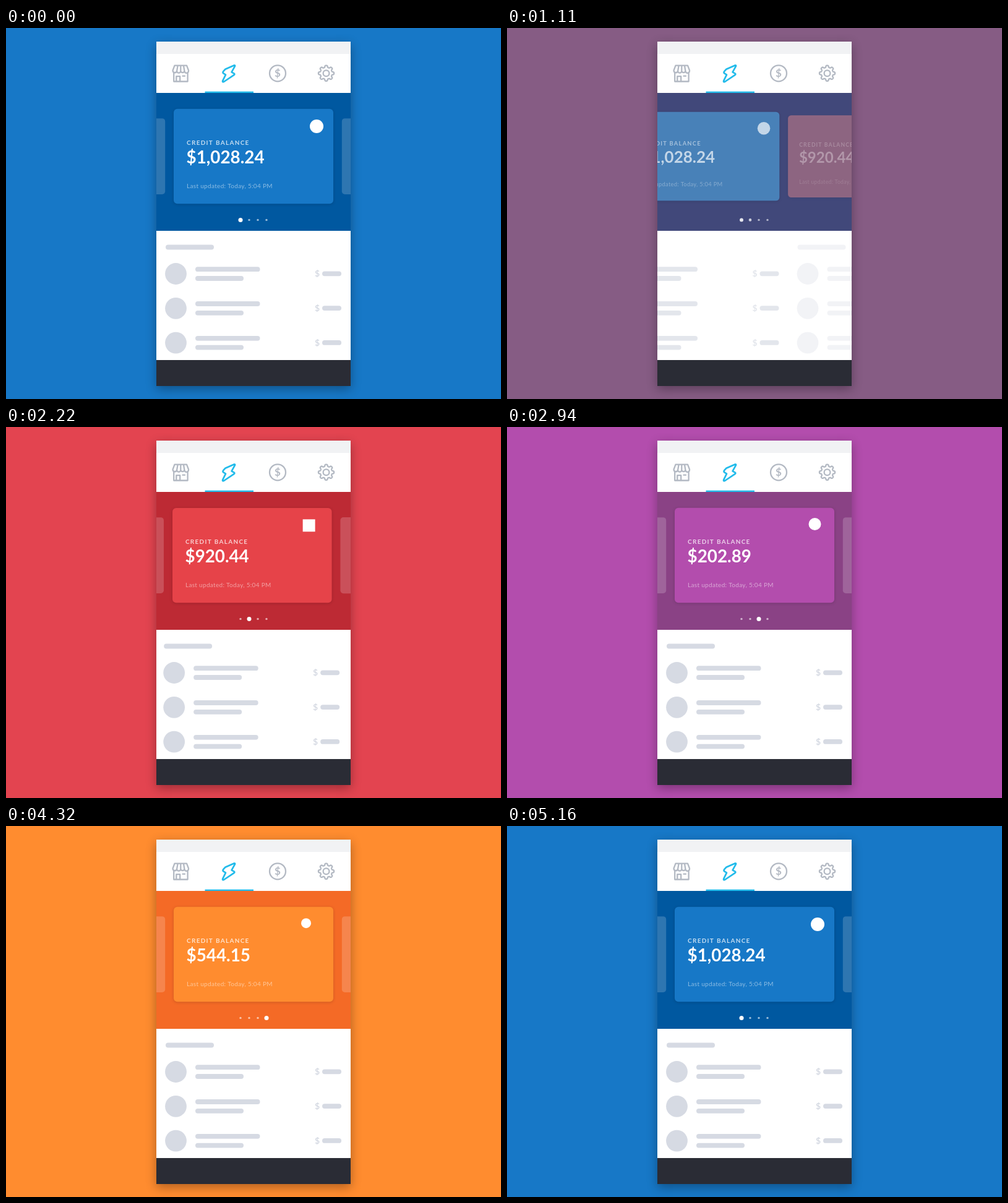
An HTML page with a canvas that plays this animation: 800 px wide and 600 px high, repeating every 5.19 s.

```html
<!DOCTYPE html>
<html lang="en">
<head>
<meta charset="utf-8">
<title>Card balances</title>
<style>
  html, body { margin: 0; width: 100%; height: 100%; overflow: hidden; }
  canvas { display: block; width: 800px; height: 600px; }
</style>
</head>
<body>
<canvas id="stage" width="800" height="600"></canvas>
<script>
const ctx = document.getElementById('stage').getContext('2d');
const LOOP = 5190, FIRST = 967, STEP = 1210.4, SLIDE = 332, FADE = 275;
const FONT = 'Lato, "Open Sans", sans-serif';
const GREY = '#d6dae3', ICON = '#b3b9c3', ACCENT = '#22bbea';
const CARD = { x: 400, y: 207.6, w: 258, h: 153.5, gap: 246 };

// mark: [shape, x, y, radius] relative to the card centre
const slides = [
  { main: [23, 120, 199], dark: [0, 88, 160], sum: '$1,028.24', mark: ['circle', 102, -48.6, 11] },
  { main: [231, 67, 73], dark: [189, 42, 51], sum: '$920.44', mark: ['square', 92, -48.4, 10] },
  { main: [179, 77, 173], dark: [138, 66, 133], sum: '$202.89', mark: ['circle', 97.5, -50.6, 10] },
  { main: [255, 140, 47], dark: [244, 106, 38], sum: '$544.15', mark: ['circle', 85, -50.4, 8] }
];

const clamp = v => Math.max(0, Math.min(1, v));
const cubic = u => u < 0.5 ? 4 * u ** 3 : 1 - 4 * (1 - u) ** 3;
const smooth = u => u * u * (3 - 2 * u);
const rgb = c => `rgb(${c.map(Math.round).join()})`;
const mix = (a, b, k) => rgb(a.map((v, i) => v + (b[i] - v) * k));

function rect(x, y, w, h, color) {
  ctx.fillStyle = color;
  ctx.fillRect(x, y, w, h);
}

function round(x, y, w, h, r, color) {
  ctx.fillStyle = color;
  ctx.beginPath();
  ctx.roundRect(x, y, w, h, r);
  ctx.fill();
}

function disc(x, y, r, color) {
  ctx.fillStyle = color;
  ctx.beginPath();
  ctx.arc(x, y, r, 0, 7);
  ctx.fill();
}

function text(str, x, y, font, color, spacing = 0, align = 'left') {
  ctx.font = `${font} ${FONT}`;
  ctx.letterSpacing = spacing + 'px';
  ctx.textAlign = align;
  ctx.fillStyle = color;
  ctx.fillText(str, x, y);
}

function shadow(color, blur, dy) {
  ctx.shadowColor = color;
  ctx.shadowBlur = blur;
  ctx.shadowOffsetY = dy;
}

const store = new Path2D(
  'M272.5 60.7H292L295 68.5V69.5A3.3 3.3 0 0 1 288.4 69.5A3.1 3.1 0 0 1 282.3 69.5' +
  'A3.1 3.1 0 0 1 276.1 69.5A3.3 3.3 0 0 1 269.6 69.5V68.5Z' +
  'M277.6 61L276.1 69.5M287 61L288.4 69.5M282.3 61V69.5' +
  'M271.2 73V86.5H293.6V73M275.3 86V78.2H281.2V86M285.5 77.7H289');
const bolt = new Path2D(
  'M369 60.3Q370.6 60.2 369.9 61.8L364.6 71.3L368.6 73.6Q370 74.6 368.6 75.8' +
  'L352 87Q349.4 87.8 350.2 85.4L355 75.6L351.2 73.2Q349.9 72 351.2 70.2L354.2 66.8Z');
const gear = new Path2D();
for (let i = 0; i < 160; i++) {
  const a = i / 160 * Math.PI * 2;
  const r = 11.1 + 1.5 * Math.tanh(2.2 * Math.cos(8 * a));
  gear.lineTo(517.5 + r * Math.cos(a), 73.2 + r * Math.sin(a));
}
gear.closePath();
gear.moveTo(522.4, 73.2);
gear.arc(517.5, 73.2, 4.9, 0, 7);
const coin = new Path2D();
coin.arc(439, 73.3, 13, 0, 7);

function drawNav() {
  rect(243, 22, 314, 20, '#f1f2f4');
  rect(243, 42, 314, 63, '#fff');
  ctx.lineWidth = 2.3;
  ctx.lineJoin = ctx.lineCap = 'round';
  ctx.strokeStyle = ICON;
  for (const icon of [store, coin, gear]) ctx.stroke(icon);
  text('$', 439, 79.2, 'bold 17px', ICON, 0, 'center');
  ctx.lineWidth = 2.7;
  ctx.strokeStyle = ACCENT;
  ctx.stroke(bolt);
  rect(321.5, 102.6, 78.5, 2.4, ACCENT);
}

function drawCard(slide, off) {
  const side = clamp(Math.abs(off)), scale = 1 - 0.2 * side;
  const { w, h } = CARD;
  ctx.save();
  ctx.translate(CARD.x + off * CARD.gap, CARD.y);
  ctx.scale(scale, scale);
  ctx.globalAlpha = 1 - side;
  shadow('rgba(0,0,0,.16)', 5, 1);
  round(-w / 2, -h / 2, w, h, 6, rgb(slide.main));
  shadow('transparent', 0, 0);
  ctx.globalAlpha = 0.18 * Math.min(1, side * 3);
  round(-w / 2, -h / 2, w, h, 6, '#fff');

  ctx.globalAlpha = 1 - side;
  const [shape, x, y, r] = slide.mark;
  if (shape === 'circle') disc(x, y, r, '#fff');
  else rect(x - r, y - r, r * 2, r * 2, '#fff');
  text('CREDIT BALANCE', -108, -18.4, 'bold 10px', 'rgba(255,255,255,.75)', 1.3);
  text(slide.sum, -108.4, 11.6, 'bold 27.8px', '#fff');
  text('Last updated: Today, 5:04 PM', -108, 51.6, '10px', 'rgba(255,255,255,.5)', 0.32);
  ctx.restore();
}

function drawList(off) {
  ctx.save();
  ctx.translate(off * 314, 0);
  ctx.globalAlpha = clamp(1 - Math.abs(off));
  round(258, 350.5, 78, 8, 4, GREY);
  for (let i = 0; i < 3; i++) {
    const y = 397.5 + i * 55.8;
    disc(274.5, y, 17.4, GREY);
    round(306, y - 11.2, 104.5, 7.8, 3.9, GREY);
    round(306, y + 3.6, 78, 7.8, 3.9, GREY);
    text('$', 503, y + 4.6, 'bold 14px', GREY, 0, 'center');
    round(511, y - 4.1, 31, 7.8, 3.9, GREY);
  }
  ctx.restore();
}

function draw(t) {
  const n = Math.max(0, Math.min(3, Math.floor((t - FIRST) / STEP)));
  const local = t - FIRST - n * STEP;
  const p = cubic(clamp(local / SLIDE));
  const from = slides[n], to = slides[(n + 1) % 4];

  rect(0, 0, 800, 600, mix(from.main, to.main, smooth(clamp(local / FADE))));
  shadow('rgba(0,0,0,.32)', 16, 5);
  rect(243, 22, 314, 557, '#fff');
  shadow('transparent', 0, 0);
  drawNav();

  ctx.save();
  ctx.beginPath();
  ctx.rect(243, 105, 314, 432);
  ctx.clip();
  rect(243, 105, 314, 223, mix(from.dark, to.dark, Math.min(1, p * 1.06)));
  for (let k = -1; k <= 2; k++) drawCard(slides[(n + k + 4) % 4], k - p);
  for (let i = 0; i < 4; i++) {
    const on = i === n ? 1 - p : i === (n + 1) % 4 ? p : 0;
    disc(379 + i * 14, 310.4, 1.7 + 1.8 * on, `rgba(255,255,255,${0.6 + 0.4 * on})`);
  }
  drawList(-p);
  drawList(1 - p);
  ctx.restore();

  rect(243, 537, 314, 42, '#2a2c35');
}

const start = performance.now();
function tick() {
  draw((performance.now() - start) % LOOP);
  requestAnimationFrame(tick);
}
tick();
</script>
</body>
</html>
```
